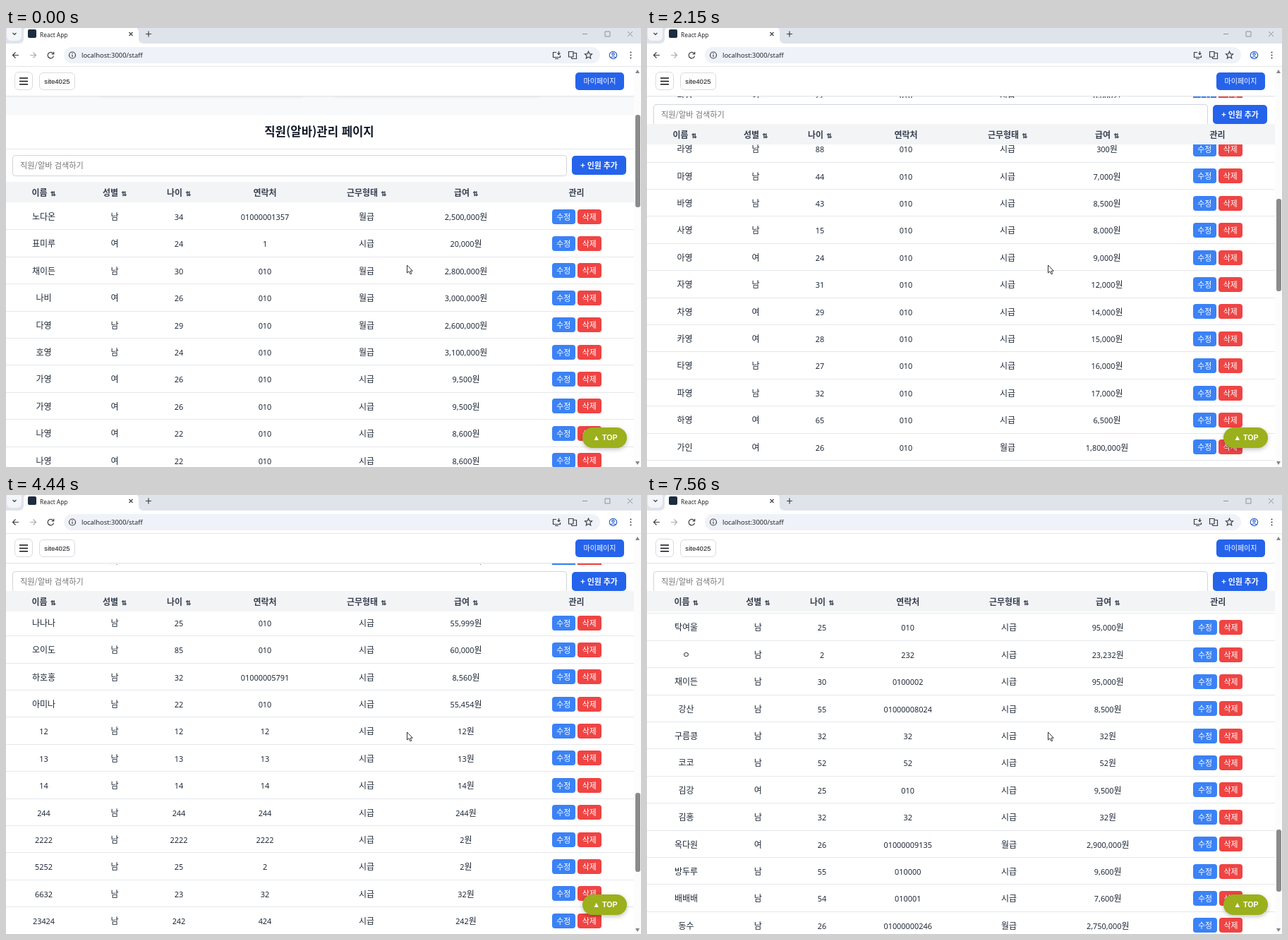
These frames come from a looping animation (900x622 px, 7.82 s). An HTML page:

```html
<!DOCTYPE html>
<html lang="ko">
<head>
<meta charset="utf-8">
<title>React App</title>
<style>
  html, body { margin: 0; width: 100%; height: 100%; overflow: hidden; background: #fff; }
  #stage {
    --s: 0; --wide: 0;
    position: relative; width: 900px; height: 622px; overflow: hidden; background: #fff;
    font: 12px "Noto Sans CJK KR", "Noto Sans CJK", sans-serif; color: #1f2937;
  }
  #stage * { box-sizing: border-box; }
  .abs, #page, #page > *, .cell, .btn, #chrome, #cursor, #thumb { position: absolute; }
  .btn { color: #fff; text-align: center; white-space: nowrap; }

  #chrome { left: 0; top: 0; }
  #chrome text { font-family: "Noto Sans", sans-serif; fill: #23262b; }

  /* app bar */
  #bar { left: 0; top: 55px; width: 890px; height: 42px; background: #fff;
    border-bottom: 1px solid #e3e5e8; box-shadow: 0 1px 3px rgba(0,0,0,.04); }
  .box { border: 1px solid #d9dbdf; border-radius: 6px; background: #fff; }
  #menu { left: 12px; top: 7px; width: 26px; height: 26px; }
  #menu svg { display: block; }
  #user { left: 47px; top: 8px; width: 51px; height: 25px; color: #111;
    font: 500 9.6px/23px "Liberation Sans", Arial, sans-serif; text-align: center; }
  #mine { left: 807px; top: 8px; width: 69px; height: 25px; border-radius: 5px;
    background: #2563eb; font-size: 10px; font-weight: 500; line-height: 24px; }

  /* scrolled page */
  #page { left: 0; top: 0; width: 890px; height: 622px; overflow: hidden; clip-path: inset(97px 0 0 0); }
  #intro, #title, #rows { left: 0; width: 890px; transform: translateY(calc(var(--s) * -1px)); }
  #intro { top: 55px; height: 68px; background: #f8f9fb; border-bottom: 1px solid #f3f4f6; }
  #intro i { position: absolute; top: 20px; width: 296px; height: 21px; border-radius: 8px;
    background: #f8f9fb; box-shadow: 0 2px 4px rgba(0,0,0,.06); }
  #title { top: 123px; height: 48.500px; border-bottom: 1px solid #e5e7eb; text-align: center;
    font-size: 16.7px; font-weight: 700; line-height: 47px; color: #111827; }
  #title span { position: relative; left: -1px; }
  #rows { top: 248px; }
  .row { position: relative; height: 38.4px; border-bottom: 1px solid #e5e7eb; }
  .cell { width: 140px; margin-left: -70px; text-align: center; line-height: 38.4px; white-space: nowrap; }
  .num { font-family: "Noto Sans", "Noto Sans CJK KR", sans-serif; font-size: 10.9px; }
  .row .btn { top: 8.7px; width: 33.5px; height: 21px; border-radius: 4px; font-size: 10.9px; line-height: 20px; }
  .edit { left: 35px; background: #3b82f6; }
  .del { left: 71.5px; background: #ef4444; }

  /* parts that stick below the app bar */
  #search { left: 0; top: 171px; width: 890px; height: 47px; background: #fff;
    transform: translateY(max(-72px, var(--s) * -1px)); }
  #input { left: 9px; top: 9px; width: 786px; height: 30px; padding-left: 10px;
    border: 1px solid #d1d5db; border-radius: 4px; color: #757575; font-size: 11.2px; line-height: 27px; }
  #add { left: 802px; top: 10px; width: 77px; height: 27px; border-radius: 5px;
    background: #2563eb; font-size: 10.9px; font-weight: 700; line-height: 27px; }
  #head { left: 0; top: 218px; width: 890px; height: 29px; background: #f3f4f6;
    color: #374151; font-weight: 700;
    transform: translateY(max(-82px, var(--s) * -1px)); }
  #head .cell { line-height: 30px; }
  #head b { margin-left: 4.5px; font: 700 9px "DejaVu Sans", sans-serif; -webkit-text-stroke: .3px; }

  #top { left: 817px; top: 566px; width: 63px; height: 29px; border-radius: 15px; background: #9bb01c;
    box-shadow: 0 2px 6px rgba(0,0,0,.25); text-indent: 1px;
    font: 700 10.6px/28px "Liberation Sans", "DejaVu Sans", sans-serif; }
  #track { left: 890px; top: 55px; width: 10px; height: 567px; background: #fcfcfc; }
  #thumb { left: 892px; width: 6.5px; border-radius: 3px; background: #8b8b8b; }
  .tip { left: 892px; border: 3.5px solid transparent; }
  #cursor { left: 567px; top: 335px; }
</style>
</head>
<body>
<div id="stage">
  <div id="page">
    <div id="intro"><i style="left:129px"></i><i style="left:463px"></i></div>
    <div id="rows"></div>
    <div id="search">
      <div id="input" class="abs">직원/알바 검색하기</div>
      <div id="add" class="btn">+ 인원 추가</div>
    </div>
    <div id="title"><span>직원(알바)관리 페이지</span></div>
    <div id="head"></div>
  </div>

  <div id="bar" class="abs">
    <div id="menu" class="abs box"><svg width="24" height="24"><path d="M6 8H18M6 12.400H18M6 16.800H18" stroke="#111" stroke-width="1.500"/></svg></div>
    <div id="user" class="abs box">site4025</div>
    <div id="mine" class="btn">마이페이지</div>
  </div>

  <div id="top" class="btn">▲ TOP</div>
  <div id="track" class="abs"></div>
  <div class="abs tip" style="top:56px;border-bottom:5px solid #858585"></div>
  <div class="abs tip" style="top:614px;border-top:5px solid #858585"></div>
  <div id="thumb"></div>

  <svg id="chrome" width="900" height="55" fill="none" stroke="#3c4043" stroke-width="1.2">
    <g stroke="none">
      <path fill="#dfe3ea" d="M0 0H900V22H0z"/>
      <path fill="#fff" d="M0 22H900V54H0zM18 22Q25 22 25 15V6Q25-1 32-1H181Q188-1 188 6V15Q188 22 195 22z"/>
      <rect x="1" y="-4" width="21" height="22" rx="6" fill="#f3f5f9"/>
      <rect x="82" y="27" width="760" height="23" rx="11.5" fill="#eff2f8"/>
      <path fill="#e4e6e9" d="M0 54H900V55H0z"/>
      <rect x="31" y="2" width="12" height="12" rx="2" fill="#1d2c40"/>
      <text x="48" y="12.5" font-size="8.4">React App</text>
      <text x="107" y="41.7" font-size="9.4">localhost:3000/staff</text>
    </g>
    <path d="M9.5 7L12 9.5 14.5 7M174.5 6L179.5 11M179.5 6L174.5 11M198 8.5H206M202 4.5V12.5"/>
    <path stroke="#8d9299" stroke-width="1" d="M817 8.5H824M849 5H856V12H849zM881 5L888 12M888 5L881 12"/>
    <path d="M18 38.5H9.5M13.5 34.5L9.5 38.5 13.5 42.5"/>
    <path stroke="#a9adb3" d="M34 38.5H42.5M38.5 34.5L42.5 38.5 38.5 42.5"/>
    <path d="M67 36.5A4.2 4.2 0 1 0 67.5 39.5M67.7 33.8V37H64.5"/>
    <circle cx="94" cy="38.5" r="4.5"/><path d="M94 38V41M94 35.8V37"/>
    <path d="M780 34.5H775.5V41.5H785.5V39M778 43.5H783M783.5 33V37.5M781.5 35.7L783.5 37.7 785.5 35.7"/>
    <path d="M797.5 33.5H804V41H797.5zM804 35.5H808.5V43.5H802L801 41"/>
    <path d="M825.5 33.3L827 36.7 830.5 37 827.9 39.4 828.7 43 825.5 41.1 822.3 43 823.1 39.4 820.5 37 824 36.7z"/>
    <g stroke="#2a5fc4"><circle cx="860.5" cy="38.5" r="5.2"/><circle cx="860.5" cy="37" r="1.7"/><path d="M857 42Q860.5 39.5 864 42"/></g>
    <path stroke-width="2" stroke-linecap="round" d="M885.5 34.5h.01M885.5 38.5h.01M885.5 42.5h.01"/>
  </svg>

  <svg id="cursor" width="12" height="16"><path d="M1.5 1V12L4 9.7 6 13.8 7.8 13 6 9.2H9.3z" fill="#fff" stroke="#333"/></svg>
</div>

<script>
// name gender age pay [phone, 010 when left out]
const STAFF = `
노다온 남 34 2500000 01000001357|표미루 여 24 20000 1|채이든 남 30 2800000|나비 여 26 3000000
다영 남 29 2600000|호영 남 24 3100000|가영 여 26 9500|가영 여 26 9500|나영 여 22 8600|나영 여 22 8600
라영 남 88 300|라영 남 88 300|마영 남 44 7000|바영 남 43 8500|사영 남 15 8000
아영 여 24 9000|자영 남 31 12000|차영 여 29 14000|카영 여 28 15000|타영 남 27 16000
파영 남 32 17000|하영 여 65 6500|가인 여 26 1800000|나인 여 26 3500001|라인 남 36 4000000
마인 남 38 4500000|바인 남 39 5000000|사인 남 26 5500000|카인 남 32 6000000
문가온 여 23 9500 01000002468|도다솜 여 25 18000000 01000003579|호호호 남 23 180000|추해든 남 32 45000
호하 남 23 32 23|남궁도루 남 45 6000000 01000004680|동동 남 50 1800 0100|ㄴㅇㄴ 남 23 23232 23
나낭 남 212 23232 23232|나나나 남 25 55999|오이도 남 85 60000|하호홍 남 32 8560 01000005791
아미나 남 22 55454|12 남 12 12 12|13 남 13 13 13|14 남 14 14 14|244 남 244 244 244
2222 남 2222 2 2222|5252 남 25 2 2|6632 남 23 32 32|23424 남 242 242 424
임 남 23 55444 32|나무 남 26 23|나비 남 26 23|조조 남 55 56454|기깅 남 52 4545 01000
자자자 남 54 54000 00001|피리안 여 25 54000|임임 여 34 1800000 0100001
강준 남 28 3500000 01000006802|마로운 남 32 8500 01000007913|탁여울 남 25 95000|ㅇ 남 2 23232 232
채이든 남 30 95000 0100002|강산 남 55 8500 01000008024|구름콩 남 32 32 32|코코 남 52 52 52
김강 여 25 9500|김홍 남 32 32 32|옥다원 여 26 2900000 01000009135|방두루 남 55 9600 010000
배배배 남 54 7600 010001|동수 남 26 2750000 01000000246`.trim().split(/[|\n]/);

// column centres, and how far each moves once the widest rows are loaded
const COLS = [[53.5, 2], [154, 3.3], [245, 3], [367, 2.7], [511, 2], [652, 1.2], [808.5, .8]];
const HEADS = ['이름', '성별', '나이', '연락처', '근무형태', '급여', '관리'];

const cell = (i, html) =>
  `<div class="cell" style="left:calc(${COLS[i][0]}px + var(--wide) * ${COLS[i][1]}px)">${html}</div>`;
const num = text => `<span class="num">${text}</span>`;

function row(line) {
  const [name, gender, age, pay, phone = '010'] = line.split(' ');
  const kind = pay >= 1e6 ? '월급' : '시급';
  const won = num(Number(pay).toLocaleString('en-US')) + '원';
  const tools = '<span class="btn edit">수정</span><span class="btn del">삭제</span>';
  const cells = [/\d/.test(name) ? num(name) : name, gender, num(age), num(phone), kind, won, tools];
  return `<div class="row">${cells.map((html, i) => cell(i, html)).join('')}</div>`;
}

const $ = id => document.getElementById(id);
$('rows').innerHTML = STAFF.map(row).join('');
$('head').innerHTML = HEADS.map((h, i) => cell(i, i === 3 || i === 6 ? h : h + '<b>⇅</b>')).join('');

const LOOP = 7820;
const smooth = p => p * p * (3 - 2 * p);
const speedUp = p => p ** 1.4;
const slowDown = p => 1 - (1 - p) ** 1.4;

// wheel bursts: first step, last step, step count, scroll reached, easing
const BURSTS = [
  [720, 1070, 6, 168, smooth],
  [1270, 1410, 3, 206, speedUp],
  [1480, 1820, 6, 503, slowDown],
  [2150, 2570, 7, 768, smooth],
  [2900, 3500, 10, 1187, smooth],
  [3830, 4440, 9, 1545, smooth],
  [4770, 5040, 5, 1712, smooth],
  [5430, 5700, 5, 1929, speedUp],
  [5770, 6040, 5, 2094, slowDown],
  [6500, 6900, 7, 2313, smooth],
  [7440, 7560, 3, 2383, speedUp],
];
const LOADS = [4440, 5700, 6900];   // ten more rows each time the end is reached

function scrollAt(t) {
  let s = 0;
  for (const [a, b, n, to, ease] of BURSTS) {
    if (t < a) break;
    const step = Math.min(n, Math.floor((t - a) / (b - a) * (n - 1) + 1e-6) + 1);
    s += (to - s) * ease(step / n);
  }
  return Math.round(s);
}

const stage = $('stage'), thumb = $('thumb');
const start = performance.now();

function draw() {
  const t = (performance.now() - start) % LOOP;
  const s = scrollAt(t);
  const loads = LOADS.filter(at => t >= at).length;
  const unit = 545 / (2363 + loads * 384);   // track length over page height
  stage.style.setProperty('--s', s);
  stage.style.setProperty('--wide', loads === 3 ? 1 : 0);
  thumb.style.top = 66 + (247 + s) * unit + 'px';
  thumb.style.height = 568 * unit + 'px';
  requestAnimationFrame(draw);
}
draw();
</script>
</body>
</html>
```
